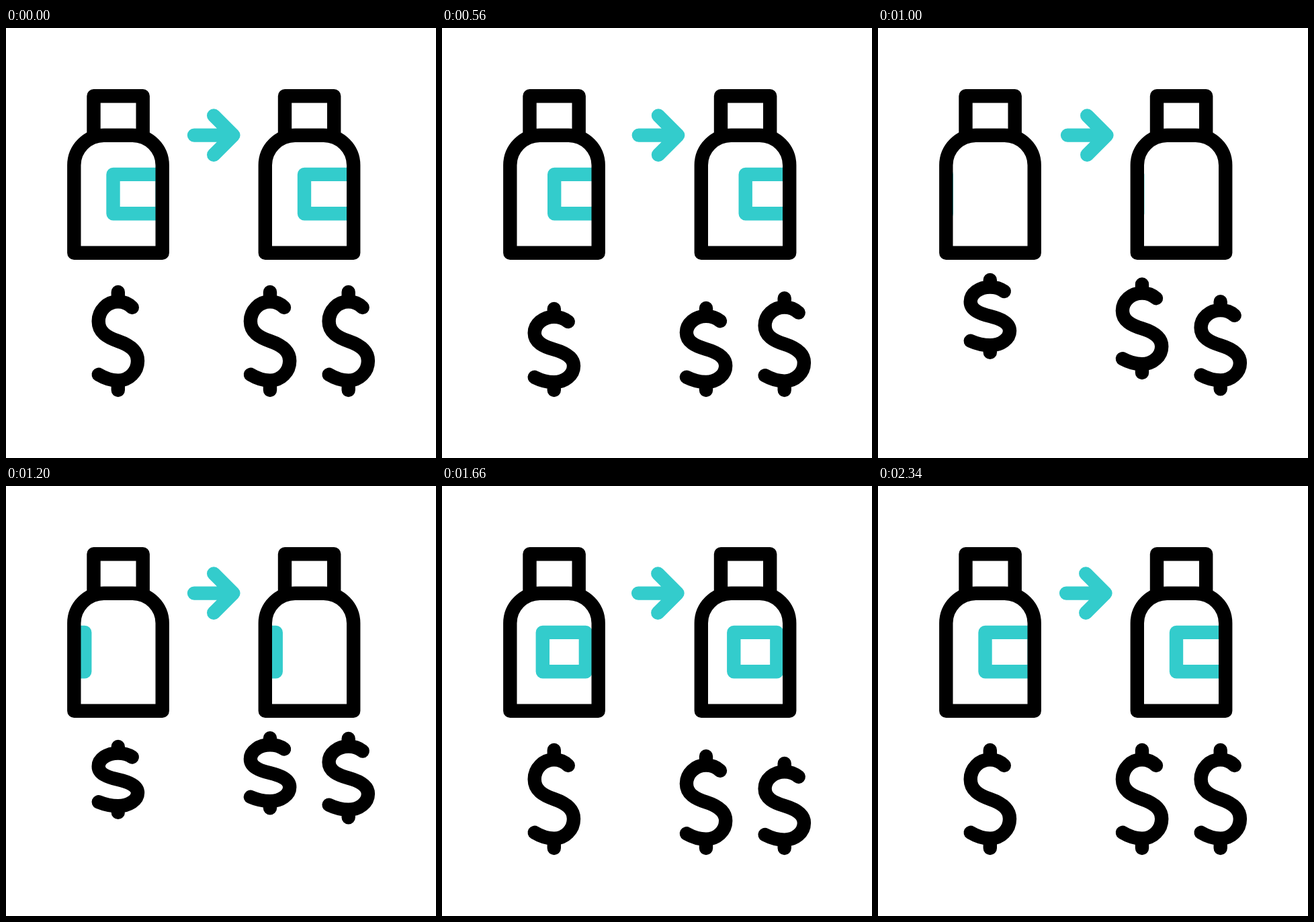
Write an HTML page with a canvas that moves like this. It is 640 px wide and 640 px high and loops after 2400 ms.

```html
<!DOCTYPE html>
<html lang="en">
<head>
<meta charset="utf-8">
<title>Bottle price comparison</title>
<style>
  html, body { margin: 0; width: 100%; height: 100%; overflow: hidden; background: #fff; }
  canvas { display: block; width: 100vmin; height: 100vmin; }
</style>
</head>
<body>
<canvas id="stage" width="640" height="640"></canvas>
<script>
const ctx = document.getElementById('stage').getContext('2d');
const LOOP = 2400, STEP = 20, LAST = 2340;
const BLACK = '#000', TEAL = '#33cccc';
const HOP_LAG = 131, SNAPPY = 2.4, GENTLE = 1.6;

const body = new Path2D(
  'M101.3 334.7V204.3A44.5 44.5 0 0 1 145.8 159.8H188.2A44.5 44.5 0 0 1 232.7 204.3V334.7Z');
const neck = new Path2D('M130.5 159.8V101.3H203.7V159.8');
const arrow = new Path2D('M280 159.6H338.4M309.2 130.4L338.4 159.6L309.2 188.8');

// Dollar sign centred on x = 0, with pin ends at y = 0 and y = 146
const dollar = new Path2D(
  'M0 0V14.3M0 131.7V146' +
  'M21 23C15.5 17.5 8.2 14.3 0 14.3C-16.1 14.3 -29.1 27.4 -29.1 43.5' +
  'C-29.1 60 -16 67.5 0 73C16 78.5 29.2 86.5 29.2 102.5' +
  'C29.2 118.6 16.1 131.7 0 131.7C-10.5 131.7 -20.5 128 -29.1 122.8');

// Key poses as [time, offset]; two keys at one time make a jump
const hopTop = [[130, 0], [510, 25], [560, 25], [1020, -18], [1040, -18], [1410, 20], [1640, 0]];
const hopBottom = [[650, 0], [1115, -60], [1400, 0]];
const labelLeft = [[460, 0], [1000, 90], [1000, -124], [1880, 10], [2160, 0]];
const labelRight = [[460, 0], [1000, 90], [1000, -131], [1930, 8], [2160, 0]];

// Symmetric ease in and out; a higher power is steeper in the middle
const ease = (p, power) => p ** power / (p ** power + (1 - p) ** power);

function pose(keys, t, power) {
  const next = keys.findIndex(key => key[0] > t);
  if (next < 1) return keys.at(next)[1];
  const [t0, v0] = keys[next - 1], [t1, v1] = keys[next];
  return v0 + (v1 - v0) * ease((t - t0) / (t1 - t0), power);
}

function drawBottle(x, t) {
  const left = 159.5 + pose(labelLeft, t, GENTLE);
  const right = 232.7 + pose(labelRight, t, GENTLE);
  ctx.save();
  ctx.translate(x, 0);
  ctx.save();
  ctx.clip(body);
  ctx.strokeStyle = TEAL;
  ctx.strokeRect(left, 217.9, right - left, 58.4);
  ctx.restore();
  ctx.strokeStyle = BLACK;
  ctx.stroke(neck);
  ctx.stroke(body);
  ctx.restore();
}

function drawArrow(t) {
  const swing = 1 - Math.abs(1 - (t % 1200) / 600);
  ctx.save();
  ctx.translate(12.8 * ease(swing, SNAPPY), 0);
  ctx.strokeStyle = TEAL;
  ctx.stroke(arrow);
  ctx.restore();
}

function drawDollar(x, t) {
  const top = 393 + pose(hopTop, t, SNAPPY);
  const bottom = 539 + pose(hopBottom, t, SNAPPY);
  const shape = new Path2D();
  shape.addPath(dollar, new DOMMatrix([1, 0, 0, (bottom - top) / 146, x, top]));
  ctx.strokeStyle = BLACK;
  ctx.stroke(shape);
}

function draw(t) {
  ctx.fillStyle = '#fff';
  ctx.fillRect(0, 0, 640, 640);
  ctx.lineWidth = 20.4;
  ctx.lineCap = ctx.lineJoin = 'round';
  [0, 284.5].forEach(x => drawBottle(x, t));
  drawArrow(t);
  [166.8, 393, 509.7].forEach((x, i) => drawDollar(x, t - i * HOP_LAG));
}

const start = performance.now();
function tick() {
  const t = (performance.now() - start) % LOOP;
  draw(Math.min(LAST, Math.floor(t / STEP) * STEP));
  requestAnimationFrame(tick);
}
tick();
</script>
</body>
</html>
```
